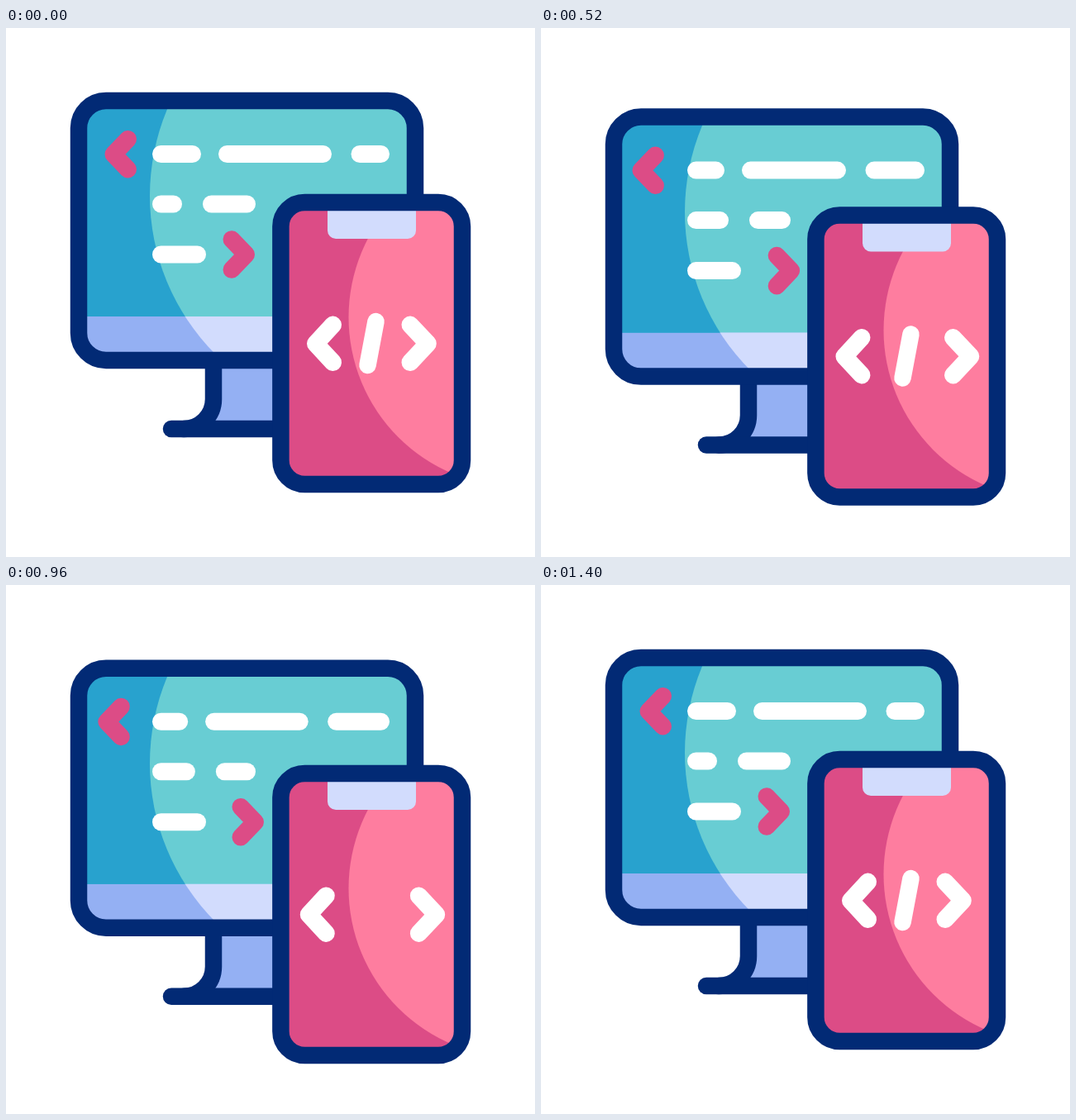
Recreate the animation shown at these times as an HTML page with a canvas. Size 640 by 640 pixels, loop 1.52 s.

```html
<!DOCTYPE html>
<html lang="en">
<head>
<meta charset="utf-8">
<title>Code on two screens</title>
<style>
html, body { margin: 0; width: 100%; height: 100%; overflow: hidden; background: #fff; }
canvas { display: block; width: 100vw; height: 100vh; }
</style>
</head>
<body>
<canvas id="stage" width="640" height="640"></canvas>
<script>
const ctx = document.getElementById('stage').getContext('2d');
const LOOP = 1520, STEP = 40;
const NAVY = '#022a75', WHITE = '#fff', PINK = '#dc4c86', ROSE = '#fe7d9f';
const BLUE = '#28a2ce', TEAL = '#68cdd3', LAVENDER = '#94b0f3', PALE = '#d2dcfd';

// cubic-bezier(.42, 0, .58, 1)
function ease(x) {
  if (x <= 0) return 0;
  if (x >= 1) return 1;
  let p = x;
  for (let i = 0; i < 6; i++) {
    const error = p * (1.26 + p * (-0.78 + p * 0.52)) - x;
    p -= error / (1.26 - 1.56 * p + 1.56 * p * p);
  }
  return p * p * (3 - 2 * p);
}

// Rises from 0 to 1 at the peak, then falls back to 0.
function swing(t, start, peak, end) {
  return t < peak ? ease((t - start) / (peak - start)) : ease((end - t) / (end - peak));
}

function line(color, width, ...points) {
  ctx.beginPath();
  for (const [x, y] of points) ctx.lineTo(x, y);
  ctx.strokeStyle = color;
  ctx.lineWidth = width;
  ctx.stroke();
}

function bar(left, right, y) {
  line(WHITE, 21, [left + 10.5, y], [right - 10.5, y]);
}

function chevron(color, tip, back, y, rise) {
  line(color, 21, [back, y - rise], [tip, y], [back, y + rise]);
}

function rect(color, x, y, w, h) {
  ctx.fillStyle = color;
  ctx.fillRect(x, y, w, h);
}

function disc(color, x, y, r) {
  ctx.beginPath();
  ctx.arc(x, y, r, 0, Math.PI * 2);
  ctx.fillStyle = color;
  ctx.fill();
}

// Draws content clipped to a rounded panel, then the navy frame around it.
function panel(x, y, w, h, r, content) {
  const shape = new Path2D();
  shape.roundRect(x, y, w, h, r);
  ctx.save();
  ctx.clip(shape);
  content();
  ctx.restore();
  ctx.strokeStyle = NAVY;
  ctx.lineWidth = 20.5;
  ctx.stroke(shape);
}

function drawStand() {
  rect(LAVENDER, 251, 402, 90, 83);
  ctx.beginPath();
  ctx.moveTo(251, 402);
  ctx.lineTo(251, 449);
  ctx.arc(215, 449, 36, 0, Math.PI / 2);
  ctx.strokeStyle = NAVY;
  ctx.lineWidth = 20.5;
  ctx.stroke();
  line(NAVY, 20.5, [200, 485], [345, 485]);
}

function drawMonitor(arrows, bars) {
  drawStand();
  panel(88, 88, 407, 314, 33, () => {
    rect(BLUE, 88, 88, 407, 314);
    disc(TEAL, 445, 203, 271);
    ctx.beginPath();
    ctx.rect(88, 349, 407, 60);
    ctx.clip();
    rect(LAVENDER, 88, 349, 407, 60);
    disc(PALE, 445, 203, 271);
  });

  const near = 22 * bars, far = 39.3 * bars;
  bar(177, 236 - near, 152.5);
  bar(257 - near, 394 - far, 152.5);
  bar(417.5 - far, 464, 152.5);
  bar(177, 213 + near, 213);
  bar(238 + near, 302, 213);
  bar(177, 242, 274);

  const left = -11.3 * arrows, right = 15.1 * arrows;
  chevron(PINK, 130 + left, 147.5 + left, 152.7, 18.3);
  chevron(PINK, 290.5 + right, 273 + right, 274, 18.3);
}

function drawPhone(spread, slash) {
  panel(332.4, 211, 219.6, 341, 29, () => {
    rect(PINK, 332, 211, 220, 341);
    disc(ROSE, 619.5, 350, 205);
    ctx.beginPath();
    ctx.roundRect(389, 205, 107, 50, 10);
    ctx.fillStyle = PALE;
    ctx.fill();
  });
  const left = -11.1 * spread, right = 14 * spread;
  chevron(WHITE, 374.5 + left, 395.5 + left, 381.8, 22.7);
  chevron(WHITE, 510.3 + right, 489 + right, 381.8, 22.7);
  if (slash) line(WHITE, 20.5, [447.5, 355], [437.5, 408]);
}

function draw(t) {
  rect(WHITE, 0, 0, 640, 640);
  ctx.lineCap = ctx.lineJoin = 'round';

  ctx.save();
  ctx.translate(0, 23.1 * swing(t, 80, 683, 1273));
  drawMonitor(swing(t, 80, 715, 1390), swing(t, 195, 755, 1315));
  ctx.restore();

  const drop = swing(t, 155, 757, 1333);
  ctx.save();
  ctx.translate(0, 22.8 * drop);
  drawPhone(drop, t < 800 || t >= 1080);
  ctx.restore();
}

const begin = performance.now();
function tick() {
  const t = (performance.now() - begin) % LOOP;
  draw(Math.floor(t / STEP) * STEP);
  requestAnimationFrame(tick);
}
tick();
</script>
</body>
</html>
```
